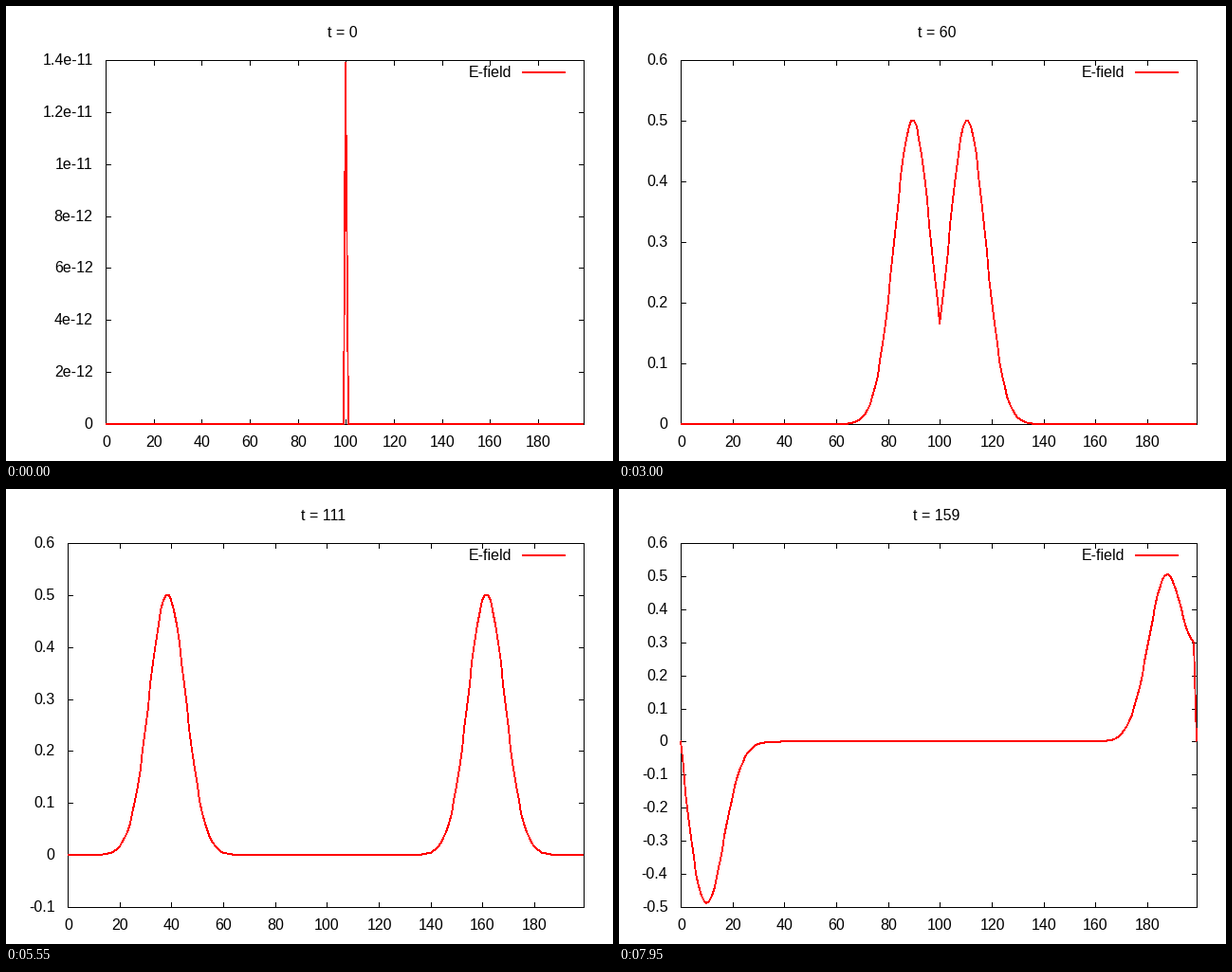
A matplotlib script for the animation above (8 s loop, 640 px wide and 480 px high).

```python
import math

import numpy as np
import matplotlib.pyplot as plt
from matplotlib.animation import FuncAnimation

W, H, DPI = 640, 480, 100
PX = 72 / DPI
STEPS, CELLS, SOURCE = 160, 200, 100
TOP, BOTTOM, RIGHT = 57, 441, 609
TIC = 5
FONT = dict(family="Liberation Sans", fontsize=16 * PX, color="black")


def simulate():
    """1D FDTD run at unit Courant number with an additive Gaussian source."""
    e, h = np.zeros(CELLS), np.zeros(CELLS)
    history = []
    for t in range(STEPS):
        h[:-2] += e[1:-1] - e[:-2]
        e[1:-1] += h[1:-1] - h[:-2]
        e[SOURCE] += math.exp(-(t - 50) ** 2 / 100)
        history.append(e.copy())
    return history


def tic_step(span):
    power = 10.0 ** math.floor(math.log10(span))
    room = 20 / (span / power)
    for limit, step in ((40, .05), (20, .1), (10, .2), (4, .5), (2, 1)):
        if room > limit:
            return step * power
    return 2 * power


def write(x, y, text, ha):
    ax.text(x, y, text, ha=ha, va="baseline", **FONT)


def stroke(xs, ys, color, width):
    # Without antialiasing every touched pixel is filled, so widths stay
    # below the whole number of pixels they should cover.
    ax.plot(xs, ys, color=color, lw=width * PX, antialiased=False, snap=False,
            solid_capstyle="butt", solid_joinstyle="miter"
            if color == "black" else "round")


def black_line(xs, ys):
    stroke(xs, ys, "black", .5)


def red_line(xs, ys):
    stroke(xs, ys, "red", .8)


def draw(t):
    ax.clear()
    ax.set(xlim=(0, W), ylim=(H, 0))
    ax.axis("off")

    e = fields[t]
    step = tic_step(e.max() - e.min())
    low, high = math.floor(e.min() / step), math.ceil(e.max() / step)
    labels = [f"{k * step:g}" if k else "0" for k in range(low, high + 1)]
    left = 35 + 10 * max(len(s.lstrip("-")) for s in labels)

    def to_x(cell):
        return np.round(left + cell * (RIGHT - left) / (CELLS - 1))

    def to_y(value):
        return np.round(BOTTOM - (value - low) * (BOTTOM - TOP) / (high - low))

    l, r, top, bottom = left + .5, RIGHT + .5, TOP + .5, BOTTOM + .5
    black_line((l, r, r, l, l, r), (top, top, bottom, bottom, top, top))
    for k, label in zip(range(low, high + 1), labels):
        y = to_y(k) + .5
        black_line((l, l + TIC), (y, y))
        black_line((r - TIC, r), (y, y))
        write(left - 13.5, y + 4.5, label, "right")
    for cell in range(0, CELLS, 20):
        x = to_x(cell) + .5
        black_line((x, x), (top, top + TIC))
        black_line((x, x), (bottom - TIC, bottom))
        write(x, 465, str(cell), "center")

    write((left + RIGHT) / 2 - 2, 33, f"t = {t}", "center")
    write(533.5, 75, "E-field", "right")
    red_line((544, 590), (70, 70))
    red_line(to_x(np.arange(CELLS)), to_y(e / step))
    return []


fields = simulate()
fig = plt.figure(figsize=(W / DPI, H / DPI), dpi=DPI, facecolor="white")
ax = fig.add_axes((0, 0, 1, 1))
anim = FuncAnimation(fig, draw, frames=STEPS, interval=50, repeat=True,
                     repeat_delay=0, init_func=lambda: [])
plt.show()
```
